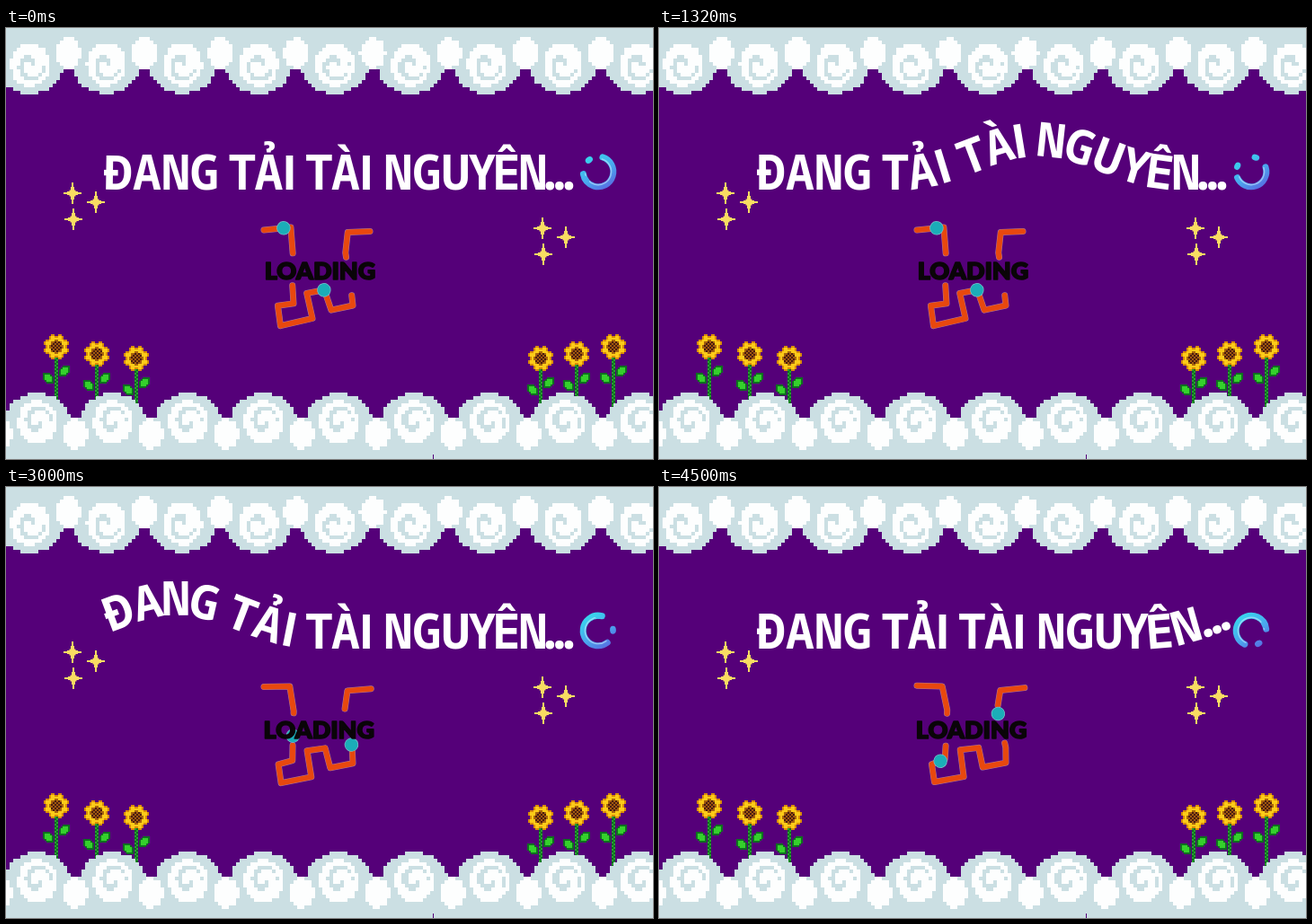
An HTML page with a canvas that plays this animation: 720x480 px, repeating every 4560 ms.

```html
<!DOCTYPE html>
<html lang="vi">
<head>
<meta charset="utf-8">
<title>Đang tải tài nguyên</title>
<style>
  html, body { margin: 0; width: 720px; height: 480px; overflow: hidden; background: #550079; }
  canvas { display: block; }
</style>
</head>
<body>
<canvas id="stage" width="720" height="480"></canvas>
<script>
const LOOP = 4560, STEP = 60, TAU = Math.PI * 2, PURPLE = '#550079';
const canvas = document.getElementById('stage');
const ctx = canvas.getContext('2d');

function box(g, color, x, y, w, h) {
  g.fillStyle = color;
  g.fillRect(x, y, w, h);
}

// Fills a pixel-art area: colorAt(x, y) gives a colour or nothing for each cell.
function pixels(g, left, top, right, bottom, cell, colorAt) {
  for (let y = top; y < bottom; y += cell) for (let x = left; x < right; x += cell) {
    const color = colorAt(x + cell / 2, y + cell / 2);
    if (color) box(g, color, x, y, cell, cell);
  }
}

// ---- still scenery ----
function drawCloudRow(g, firstX, pitch) {
  const grey = '#cbdfe3', white = '#fdfefe';
  pixels(g, 0, 406, 720, 482, 4, (x, y) => {
    const dx = x - firstX - pitch * Math.round((x - firstX) / pitch), dy = y - 439;
    if (Math.hypot(dx * 0.86, dy) > 32 && y < 433) return;
    const r = Math.hypot(dx * 1.1, dy), turn = Math.atan2(dy, dx) / TAU;
    const swirl = ((r / 17 - turn) % 1 + 1) % 1;
    const puff = Math.hypot((pitch / 2 - Math.abs(dx)) * 1.2, dy - 13) < 17;
    return r < 24 && (r > 18 || swirl > 0.33) || puff ? white : grey;
  });
}

function drawFlower(g, cx, cy) {
  g.save();
  g.translate(cx, cy);
  pixels(g, -2, 12, 2, 68, 2, (x, y) => (x + y) % 4 ? '#0c6a20' : '#27a030');
  for (const side of [-1, 1]) {
    const midX = side * 9, midY = 31 - side * 4;
    pixels(g, midX - 8, midY - 8, midX + 8, midY + 8, 2, (x, y) => {
      const u = (x - midX) * side, v = y - midY;
      const d = Math.hypot((u - v) / 11, (u + v) / 7);
      return d < 0.6 ? '#35d02c' : d < 1 && '#0f7020';
    });
  }
  pixels(g, -16, -16, 16, 16, 2, (x, y) => {
    const r = Math.hypot(x, y), edge = 13.5 - 1.3 * Math.cos(8 * Math.atan2(y, x));
    if (r > edge) return;
    if (r < 6) return (x + y) % 4 ? '#4a1d10' : '#a0580f';
    return r < 7.5 ? '#a8660c' : r > edge - 1.8 ? '#d88a08' : '#fccb18';
  });
  g.restore();
}

function drawSparkle(g, x, y) {
  for (const [w, h] of [[2, 24], [20, 2], [4, 14], [12, 4], [7, 7]]) {
    box(g, '#f8dc62', x - w / 2, y - h / 2, w, h);
  }
}

const scenery = document.createElement('canvas');
scenery.width = 720;
scenery.height = 480;
{
  const g = scenery.getContext('2d');
  box(g, PURPLE, 0, 0, 720, 480);
  for (const [x, y] of [[56, 355], [101, 363], [145, 368], [595, 368], [635, 363], [676, 355]]) drawFlower(g, x, y);
  drawCloudRow(g, 35, 83.9);
  g.setTransform(1, 0, 0, -1, 0, 480);
  drawCloudRow(g, 27, 84.7);
  g.resetTransform();
  box(g, PURPLE, 475, 475, 1, 5);
  for (const [x, y] of [[74, 184], [597, 223]]) {
    drawSparkle(g, x, y);
    drawSparkle(g, x + 26, y + 10);
    drawSparkle(g, x + 1, y + 29);
  }
}

// ---- title: a bump travels along the line ----
const WAVE = { period: 2366, speed: 0.339, start: -25, reach: 152, height: 37 };
const advance = letter => letter === 'I' ? 14 : letter === ' ' ? 12.5 : 'TYÊ…'.includes(letter) ? 27 : 32;
let penX = 109;
const title = [...'ĐANG TẢI TÀI NGUYÊN…'].map(letter => {
  const width = advance(letter);
  penX += width;
  return { letter, x: penX - width / 2 };
});

function drawTitle(t) {
  const peak = WAVE.start + WAVE.speed * (t % WAVE.period);
  ctx.fillStyle = '#fff';
  ctx.textAlign = 'center';
  for (const { letter, x } of title) {
    const u = Math.max(-1, Math.min(1, (x - peak) / WAVE.reach));
    const lift = WAVE.height * Math.cos(u * Math.PI / 2) ** 2;
    const slope = WAVE.height * Math.PI / 2 / WAVE.reach * Math.sin(u * Math.PI);
    ctx.save();
    ctx.translate(x, 161 - lift);
    ctx.rotate(Math.atan(slope));
    ctx.font = letter === 'I' ? '700 53px Roboto, sans-serif'
      : '700 semi-condensed 53px "Noto Sans Mono", "DejaVu Sans Mono", monospace';
    ctx.fillText(letter, 0, 19);
    ctx.restore();
  }
}

// ---- hand-drawn loading track with two balls on it ----
const TRACK = [
  [287, 223], [316, 222], [320, 250], [319, 286], [319, 305], [303, 309], [306, 330], [340, 323],
  [335, 294], [355, 291], [361, 313], [386, 308], [385, 291], [377, 249], [380, 227], [406, 225]
];
const VISIBLE = [59, 36, 205, 43, 60];
const DOODLE = { period: 1290, poses: 7, ballGap: 218, ballStart: 22 };

function drawLoading(t) {
  const pose = Math.floor(t % DOODLE.period / DOODLE.period * DOODLE.poses);
  const sway = Math.cos(pose / DOODLE.poses * TAU);
  const track = new Path2D();
  TRACK.forEach(([x, y], i) => track.lineTo(x + sway * Math.sin(i * 2), y + sway * (1 + Math.cos(i * 3))));
  const trace = (color, width) => {
    ctx.strokeStyle = color;
    ctx.lineWidth = width;
    ctx.stroke(track);
  };
  ctx.save();
  ctx.lineCap = ctx.lineJoin = 'round';
  ctx.setLineDash(VISIBLE);
  trace('#a878a0', 7);
  trace('#e8480e', 6);
  ctx.setLineDash([0.01, DOODLE.ballGap]);
  ctx.lineDashOffset = -DOODLE.ballStart - DOODLE.ballGap * pose / DOODLE.poses;
  trace('#78bcc8', 15.5);
  trace('#1badb8', 14);
  ctx.setLineDash([]);
  ctx.font = '900 27px Lato, sans-serif';
  ctx.fillStyle = ctx.strokeStyle = '#0a0508';
  ctx.lineWidth = 1.5;
  ctx.fillText('LOADING', 348.5 + sway, 280);
  ctx.strokeText('LOADING', 348.5 + sway, 280);
  ctx.restore();
}

// ---- smiley: turns steadily while its mouth grows and shrinks ----
const ringColor = ctx.createLinearGradient(646, 140, 672, 180);
ringColor.addColorStop(0, '#35dcec');
ringColor.addColorStop(0.55, '#4aa8ee');
ringColor.addColorStop(1, '#5a66e0');

function drawSmile(t) {
  const rad = TAU / 360;
  const turn = -73 + 0.0418 * t;
  const mouth = 215 + 43 * Math.cos((t - 300) / (LOOP / 2) * TAU);
  const arc = (radius, width, color) => {
    ctx.beginPath();
    ctx.arc(0, 0, radius, 0, mouth * rad);
    ctx.lineWidth = width;
    ctx.strokeStyle = color;
    ctx.stroke();
  };
  ctx.save();
  ctx.lineCap = 'round';
  arcAtCentre();
  ctx.restore();

  function arcAtCentre() {
    ctx.translate(659, 160);
    ctx.rotate(turn * rad);
    const color = ctx.createLinearGradient(...spin(-13, -20), ...spin(13, 20));
    color.addColorStop(0, '#35dcec');
    color.addColorStop(0.55, '#4aa8ee');
    color.addColorStop(1, '#5a66e0');
    arc(16.8, 7, color);
    arc(14.6, 1.5, 'rgba(205,240,255,.55)');
    ctx.fillStyle = color;
    for (const angle of [-140, -55]) {
      ctx.beginPath();
      ctx.ellipse(16.5 * Math.cos(angle * rad), 16.5 * Math.sin(angle * rad), 4.4, 3.4, angle * rad + TAU / 4, 0, TAU);
      ctx.fill();
    }
  }

  // Keeps the colour direction fixed on the stage while the face turns.
  function spin(x, y) {
    const c = Math.cos(turn * rad), s = Math.sin(turn * rad);
    return [x * c + y * s, y * c - x * s];
  }
}

function draw(now) {
  const t = Math.floor(now % LOOP / STEP) * STEP;
  ctx.drawImage(scenery, 0, 0);
  drawTitle(t);
  drawLoading(t);
  drawSmile(t);
}

const begin = performance.now();
(function tick() {
  draw(performance.now() - begin);
  requestAnimationFrame(tick);
})();
</script>
</body>
</html>
```
